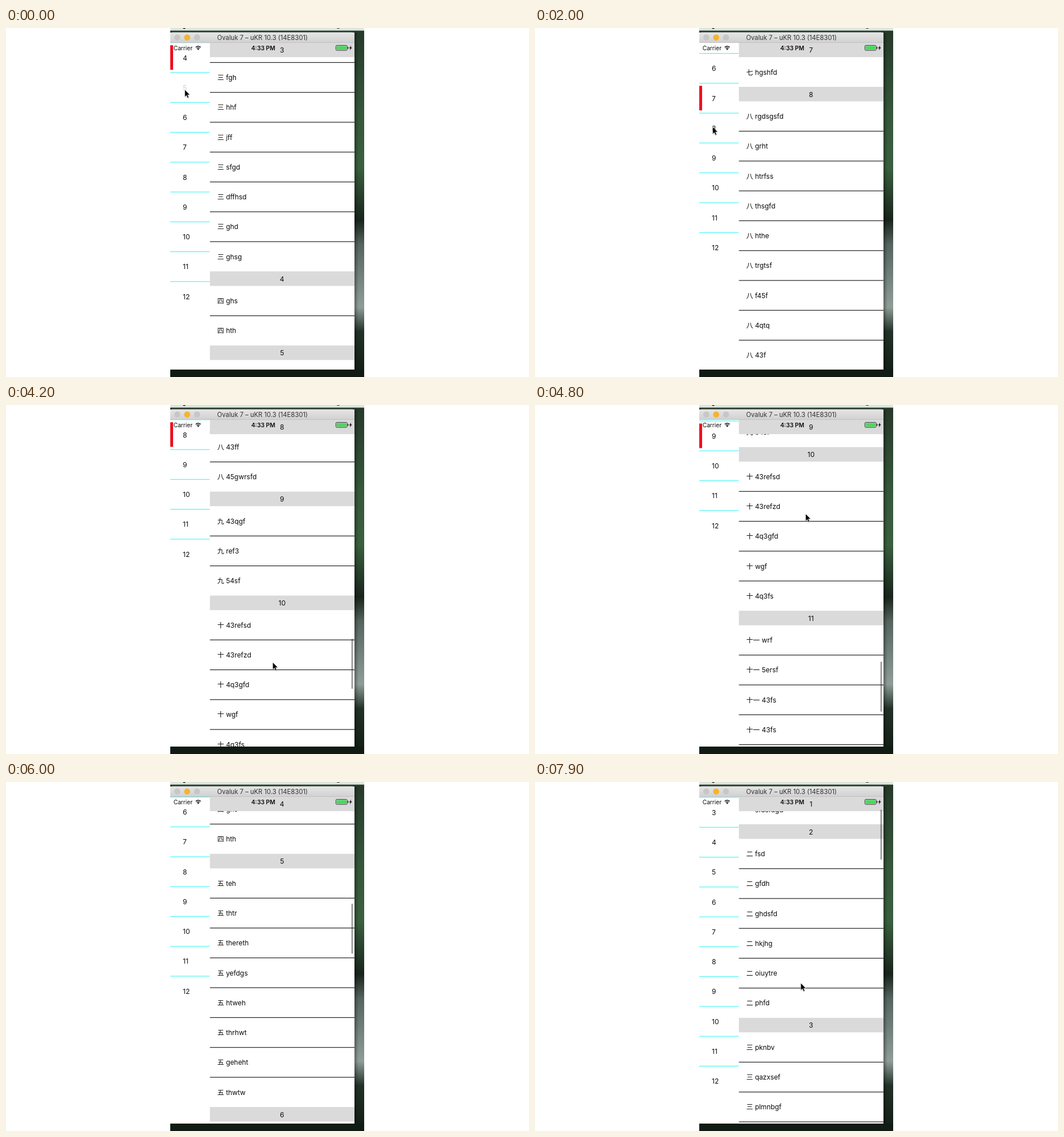
Recreate the animation shown at these times as an HTML page with a canvas. Size 917x611 px, loop 8000 ms.

```html
<!DOCTYPE html>
<html lang="en">
<head>
<meta charset="utf-8">
<title>Linked lists</title>
<style>
html, body { margin: 0; width: 100%; height: 100%; overflow: hidden; background: #fff; }
canvas { display: block; }
</style>
</head>
<body>
<canvas id="stage" width="917" height="611"></canvas>
<script>
const ctx = document.getElementById('stage').getContext('2d');
const LOOP = 8000, STEP = 100;
const TOP = 25.6, BOTTOM = 598, LEFT = 288, SPLIT = 357.3, RIGHT = 611;
const ROW = 52.27, HEAD = 25.15;
const JUMP = 385, FOLLOW = 300, LAG = 40, DRAG = 3000;
const FONT = 'Inter, "Noto Sans CJK SC", "Noto Sans CJK", sans-serif';

const sections = [
  '一 fdsa gfds sfdsfdgd',
  '二 fsd gfdh ghdsfd hkjhg oiuytre phfd',
  '三 pknbv qazxsef plmnbgf wsdf hgf fgh hhf jff sfgd dffhsd ghd ghsg',
  '四 ghs hth',
  '五 teh thtr thereth yefdgs htweh thrhwt geheht thwtw',
  '六 hsgfd trhs gfht',
  '七 hgshfd',
  '八 rgdsgsfd grht htrfss thsgfd hthe trgtsf f45f 4qtq 43f 43ff 45gwrsfd',
  '九 43qgf ref3 54sf',
  '十 43refsd 43refzd 4q3gfd wgf 4q3fs',
  '十一 wrf 5ersf 43fs 43fs gre',
  '十二 fsd 43rf wef gfs 5trg hgf',
].map(line => {
  const [mark, ...words] = line.split(' ');
  return { rows: words.map(w => mark + ' ' + w), height: HEAD + words.length * ROW };
});
sections.reduce((y, s) => (s.y = y) + s.height, 0);

const FIRST_SCROLL = 772.6, FIRST_ITEM = 4;
const clicks = [{ at: 100, item: 5 }, { at: 1500, item: 7 }];
// Turning points of the dragged list: time, offset
const drags = [
  [DRAG, sections[6].y], [3600, 2242.7], [4300, 2519], [4800, 2739.5], [4950, 2775],
  [6000, 1202.7], [6800, 842.7], [LOOP, 69]];
// Resting points of the pointer: time, x, y
const pointer = [
  [900, 313.5, 108], [1300, 311.5, 173], [2200, 311.5, 173], [2700, 446, 408], [DRAG, 446, 409],
  [3600, 453, 147], [4250, 468, 455], [4800, 474.5, 190.5], [5800, 455, 588], [6300, 450, 320],
  [6800, 446, 534.5], [7300, 462, 215], [7900, 466, 352]];

const clamp = u => Math.max(0, Math.min(1, u));
const linear = u => u;
const smooth = u => (1 - Math.cos(Math.PI * clamp(u))) / 2;

function along(track, t, ease) {
  const i = Math.max(1, track.findIndex(k => k[0] >= t) + 1 || track.length) - 1 || 1;
  const a = track[i - 1], b = track[i], u = ease(clamp((t - a[0]) / (b[0] - a[0])));
  return a.slice(1).map((v, j) => v + (b[j + 1] - v) * u);
}

function listOffset(t) {
  if (t >= DRAG) return along(drags, t, linear)[0];
  return clicks.reduce(
    (y, c) => y + (sections[c.item - 1].y - y) * smooth((t - c.at) / JUMP), FIRST_SCROLL);
}

const topSection = t => sections.filter(s => s.y <= listOffset(t) + .5).length;

// The menu selects on a click, and whenever another section reaches the top of the dragged list.
const picks = clicks.map(c => ({ ...c, follow: c.at + JUMP }));
for (let t = DRAG + 10; t < LOOP; t += 10) {
  const now = topSection(t), before = topSection(t - 10);
  if (now !== before) picks.push({ at: t, item: now + (now < before), follow: t + LAG });
}

function menuOffset(t) {
  let item = FIRST_ITEM, y = (item - 1) * ROW;
  for (const p of picks) {
    y += (p.item - item) * ROW * smooth((t - p.follow) / FOLLOW);
    item = p.item;
  }
  return y;
}

function box(x, y, w, h, fill) {
  ctx.fillStyle = fill;
  ctx.fillRect(x, y, w, h);
}

function round(x, y, w, h, r, fill) {
  ctx.fillStyle = fill;
  ctx.beginPath();
  ctx.roundRect(x, y, w, h, r);
  ctx.fill();
}

function disc(x, y, r, fill) {
  ctx.fillStyle = fill;
  ctx.beginPath();
  ctx.arc(x, y, r, 0, 7);
  ctx.fill();
}

function poly(points, fill) {
  ctx.fillStyle = fill;
  ctx.beginPath();
  points.forEach(([x, y]) => ctx.lineTo(x, y));
  ctx.closePath();
  ctx.fill();
}

function label(text, x, y, size = 11.9, align = 'left', fill = '#0a0a0a', weight = 400) {
  ctx.font = `${weight} ${size}px ${FONT}`;
  ctx.textAlign = align;
  ctx.fillStyle = fill;
  ctx.fillText(text, x, y + size * 0.36);
}

function fade(x0, y0, x1, y1, stops) {
  const g = ctx.createLinearGradient(x0, y0, x1, y1);
  stops.forEach(([at, c]) => g.addColorStop(at, c));
  return g;
}

const photo = fade(0, 0, 0, 611, [
  [0, '#26382a'], [.25, '#35583a'], [.4, '#3a5f3e'], [.55, '#18241c'],
  [.62, '#55645e'], [.8, '#8f9d98'], [.87, '#223128'], [1, '#101c14']]);
const titleFill = fade(0, 7, 0, 26, [[0, '#e6e6e6'], [1, '#d0d0d0']]);
const shade = fade(RIGHT, 0, 618, 0, [[0, 'rgba(0,0,0,.35)'], [1, 'rgba(0,0,0,0)']]);

function backdrop() {
  box(0, 0, 917, 611, '#fff');
  box(LEFT, 0, 340, 8, photo);
  box(RIGHT, 0, 17, 611, photo);
  box(RIGHT, 8, 7, 603, shade);
  box(LEFT, BOTTOM, 340, 13, '#101b14');
  box(LEFT, 0, 340, 4.6, '#dde6dc');
  disc(312.5, -1, 2.5, '#222');
  round(580, -2, 5, 3, 1, '#333');
}

function titleBar() {
  round(LEFT, 7.5, RIGHT - LEFT, 18.3, [4, 4, 0, 0], titleFill);
  box(LEFT, 25.2, RIGHT - LEFT, .7, '#b8b8b8');
  ['#c8c6c8', '#f6b32f', '#c8c6c8'].forEach((c, i) => disc(300.3 + i * 17.3, 16.6, 5.3, c));
  label('Ovaluk 7 – uKR 10.3 (14E8301)', 449.7, 16.8, 11.2, 'center', '#333');
}

function statusBar() {
  label('Carrier', 293.7, 35, 10.2);
  label('4:33 PM', 451, 35, 10.3, 'center', '#0a0a0a', 600);
  ctx.strokeStyle = '#111';
  ctx.lineWidth = 1.4;
  for (const r of [3.4, 6]) {
    ctx.beginPath();
    ctx.arc(337, 38, r, -Math.PI * .76, -Math.PI * .24);
    ctx.stroke();
  }
  disc(337, 37.3, 1.2, '#111');
  ctx.lineWidth = .8;
  ctx.beginPath();
  ctx.roundRect(578.4, 30.4, 19.8, 8.8, 1.8);
  ctx.stroke();
  round(579.6, 31.6, 17.4, 6.4, .8, '#4cd75f');
  round(599, 33, 1.3, 3.6, .6, '#222');
  poly([[605.3, 30.5], [601.7, 35.4], [603.8, 35.4], [602.9, 39.2], [606.6, 34], [604.5, 34]], '#111');
}

function clipped(x, w, paint) {
  ctx.save();
  ctx.beginPath();
  ctx.rect(x, 25.8, w, BOTTOM - 25.8);
  ctx.clip();
  paint();
  ctx.restore();
}

function menu(offset, active, pressed) {
  for (let n = 1; n <= sections.length; n++) {
    const y = TOP + (n - 1) * ROW - offset;
    label(n, 310, y + 26.6, 12, 'left', n === pressed ? '#ccc' : '#0a0a0a');
    if (n === active) box(LEFT, y + 4.6, 5, 43, '#ee0f20');
    if (n < sections.length) box(LEFT, y + ROW - .4, SPLIT - LEFT, 1.1, '#3ff5f5');
  }
}

function list(offset) {
  const w = RIGHT - SPLIT;
  for (const s of sections) {
    s.rows.forEach((text, i) => {
      const y = TOP + s.y - offset + HEAD + i * ROW;
      label(text, 370.4, y + 26.6);
      if (i < s.rows.length - 1) box(SPLIT, y + ROW - .4, w, 1.2, '#222');
    });
  }
  sections.forEach((s, i) => {
    const y = TOP + s.y - offset;
    const head = Math.min(Math.max(y, TOP), y + s.height - HEAD);
    box(SPLIT, head, w, HEAD + .3, '#dadada');
    label(i + 1, 484, head + 13.2, 12, 'center');
  });
}

function arrow([x, y]) {
  ctx.save();
  ctx.translate(x, y);
  ctx.shadowColor = 'rgba(0,0,0,.3)';
  ctx.shadowBlur = 2;
  ctx.shadowOffsetY = 1;
  poly([[0, 0], [0, 12.6], [2.9, 9.9], [4.9, 14.5], [7, 13.6], [5, 9.1], [8.9, 9.1]], '#000');
  ctx.shadowColor = 'transparent';
  ctx.strokeStyle = '#fff';
  ctx.lineWidth = .6;
  ctx.stroke();
  ctx.restore();
}

function draw(t) {
  const offset = listOffset(t);
  const active = picks.reduce((n, p) => p.at <= t ? p.item : n, FIRST_ITEM);
  const press = clicks.find(c => t >= c.at - STEP && t < c.at);
  backdrop();
  clipped(LEFT, SPLIT - LEFT, () => menu(menuOffset(t), active, press?.item));
  clipped(SPLIT, RIGHT - SPLIT, () => list(offset));
  if (t >= DRAG) round(605.7, 28 + offset * .1538, 2.5, 87.5, 1.2, 'rgba(0,0,0,.42)');
  titleBar();
  statusBar();
  if (Math.abs(t - 6000) > STEP) arrow(along(pointer, t, smooth));
}

const start = performance.now();
function tick() {
  const t = (performance.now() - start) % LOOP;
  draw(Math.floor(t / STEP) * STEP);
  requestAnimationFrame(tick);
}
tick();
</script>
</body>
</html>
```
